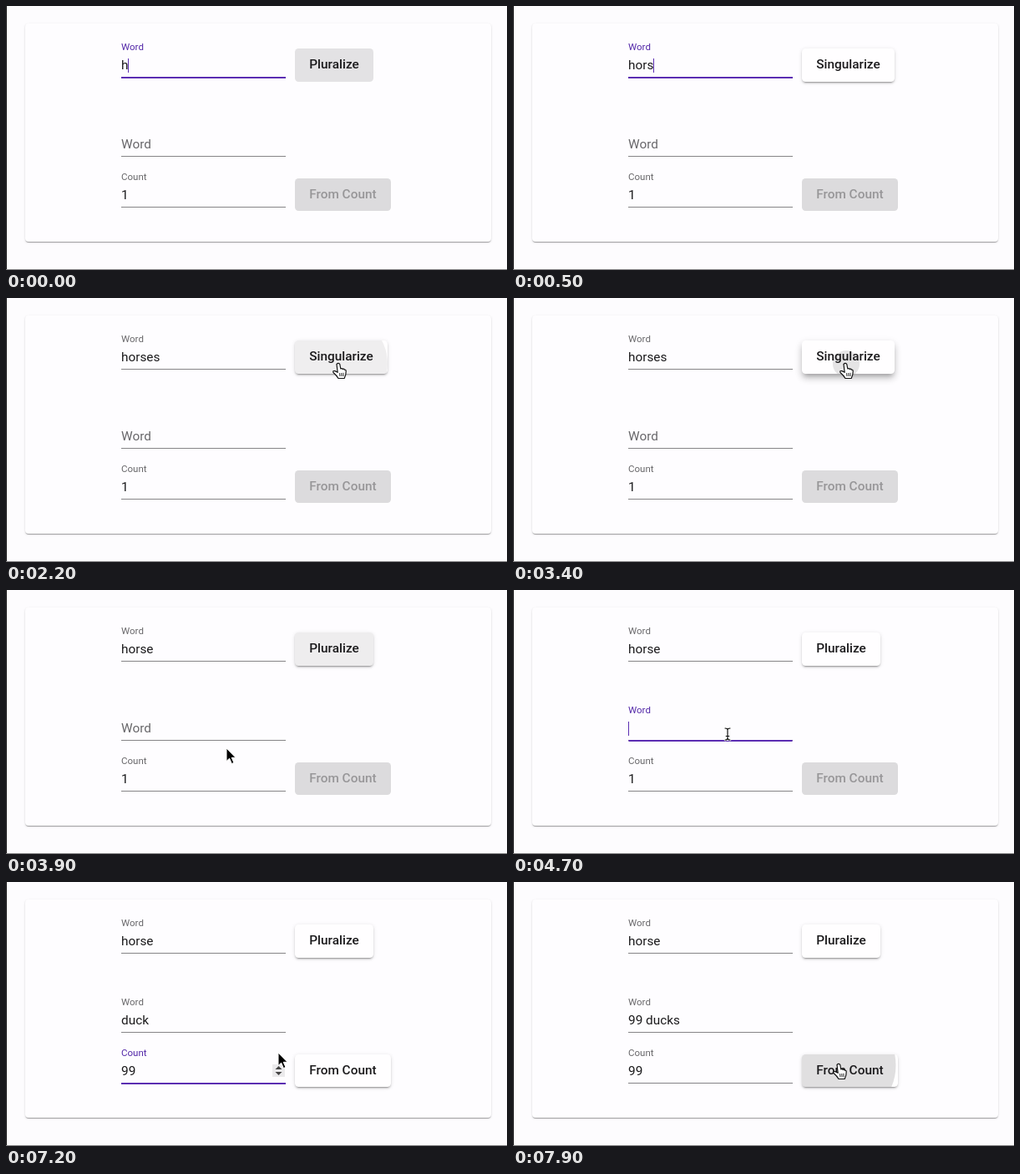
An HTML page that plays this animation: 600x317 px, repeating every 8000 ms.

```html
<!DOCTYPE html>
<html lang="en">
<head>
<meta charset="utf-8">
<title>Pluralize form</title>
<style>
  html, body { margin: 0; width: 100%; height: 100%; overflow: hidden; background: #fdfcfe; }
  #stage { position: relative; width: 600px; height: 317px; overflow: hidden;
    font: 15.36px/20px Roboto, sans-serif; color: #1b1a1c; white-space: nowrap; }
  #stage div, #stage i, #stage svg { position: absolute; }
  .left { left: 0; top: 0; width: 1px; height: 317px; background: #1c1b1d; }
  .bottom { left: 0; top: 316px; width: 600px; height: 1px; background: #828183; }
  .card { left: 23px; top: 21px; width: 557.5px; height: 262px; border-radius: 4px; background: #fefdff;
    box-shadow: 0 2px 1px -1px rgba(0,0,0,.2), 0 1px 1px rgba(0,0,0,.14), 0 1px 3px rgba(0,0,0,.12); }
  .field { left: 138px; width: 197px; height: 48px; }
  .label { left: 0; top: 21.2px; transform-origin: 0 50%; }
  .text { left: 0; top: 21.2px; }
  .text span { padding: 1px 0; }
  .caret { top: 2px; width: 1px; height: 17px; background: #5b2db2; }
  .line { left: 0; top: 45px; width: 197px; height: 1px; background: #858486; }
  .focus { left: 0; top: 45px; width: 197px; height: 2px; background: #5b2db2; }
  .spin { right: 1px; top: 23.5px; width: 15px; height: 15px; background: #ebeaec; }
  .button { left: 345.8px; height: 39.4px; padding: 0 17.5px; border-radius: 4.4px;
    font-weight: 500; line-height: 39.4px;
    box-shadow: 0 3px 1px -2px rgba(0,0,0,calc(.2*var(--up))), 0 2px 2px rgba(0,0,0,calc(.14*var(--up))),
      0 1px 5px rgba(0,0,0,calc(.12*var(--up))); }
  .button.down { box-shadow: 0 5px 5px -3px rgba(0,0,0,.2), 0 6px 8px 0 rgba(0,0,0,.14), 0 3px 8px 1px rgba(0,0,0,.1); }
  .button span { position: relative; }
  .clip { inset: 0; overflow: hidden; border-radius: inherit; }
  .ripple { border-radius: 50%; background: #000; }
  #cursor { left: 0; top: 0; overflow: visible; width: 1px; height: 1px; }
</style>
</head>
<body>
<div id="stage">
  <div class="card"></div>
  <div class="left"></div>
  <div class="bottom"></div>
  <svg id="cursor">
    <g id="arrow"><path d="M0 0V15.5L3.6 12.2 6.4 18.6 9 17.4 6.2 11.3H11Z" fill="#000" stroke="#fff"/></g>
    <g id="hand">
      <path d="M-2 1.5Q0-.8 1.8 1.5L2.8 7Q4 5.8 5 7.4 6.6 6.4 7.4 8.2 9.2 7.8 9.2 10 9.4 14 7.2 18.5H0Q-2 15-6 11.5-7 9-4 9.6L-.8 11.3Z"
        fill="#fff" stroke="#111" stroke-width="1.2" stroke-linejoin="round"/>
      <path d="M1.5 12.2L2 16M3.7 12L4.1 16M5.9 11.8L6.1 16" stroke="#111" stroke-width=".9"/>
    </g>
    <g id="beam" fill="none" stroke-linecap="round">
      <path d="M-3-7Q0-7 0-5V5Q0 7-3 7M3-7Q0-7 0-5M0 5Q0 7 3 7M-1.8 2.5H1.8" stroke="#fff" stroke-width="2.6"/>
      <path d="M-3-7Q0-7 0-5V5Q0 7-3 7M3-7Q0-7 0-5M0 5Q0 7 3 7M-1.8 2.5H1.8" stroke="#111" stroke-width="1.2"/>
    </g>
  </svg>
</div>
<script>
const LOOP = 8000, STEP = 100;
const stage = document.getElementById('stage');
const cursor = document.getElementById('cursor');

const clamp = v => Math.min(1, Math.max(0, v));
const easeOut = p => 1 - (1 - clamp(p)) ** 3;
const ramp = (t, start, length) => easeOut((t - start) / length);
const within = (t, spans) => spans.some(([a, b]) => t >= a && t < b);
const mix = (a, b, p) => `rgb(${a.map((v, i) => Math.round(v + (b[i] - v) * p))})`;
const latest = (t, steps) => steps.reduce((value, [at, next]) => t >= at ? next : value, '');

// Linear interpolation through [time, ...values] rows.
function track(t, rows) {
  const i = rows.findIndex(row => row[0] > t);
  if (i < 0) return rows[rows.length - 1].slice(1);
  if (i === 0) return rows[0].slice(1);
  const a = rows[i - 1], b = rows[i], p = (t - a[0]) / (b[0] - a[0]);
  return a.slice(1).map((v, k) => v + (b[k + 1] - v) * p);
}

function add(parent, className, tag = 'div') {
  const node = document.createElement(tag);
  node.className = className;
  return parent.appendChild(node);
}

const GREY = [104, 103, 106], PURPLE = [83, 40, 168];

const fields = [
  { top: 40, label: 'Word', focus: [-1000, 1600], floatAt: -1000,
    caret: [[0, 1200]],
    text: [[0, 'h'], [100, 'ho'], [300, 'hor'], [500, 'hors'], [700, 'horse'],
           [1800, 'horses'], [3500, 'horse']] },
  { top: 135, label: 'Word', focus: [4540, 5650], floatAt: 4540,
    caret: [[4600, 5700]],
    text: [[5200, 'd'], [5300, 'du'], [5400, 'duc'], [5500, 'duck'], [7800, '99 ducks']] },
  { top: 195.7, label: 'Count', focus: [5650, 7640], floatAt: -1000, spinner: true,
    caret: [[6300, 7000], [7500, 7640]], selected: [[5700, 6300]],
    text: [[0, '1'], [6300, '9'], [6500, '99']] }
];

const buttons = [
  { top: 51.3, enableAt: -30, pressed: [[1600, 1800], [3400, 3500]],
    text: [[0, 'Pluralize'], [500, 'Singularize'], [700, 'Pluralize'],
           [1800, 'Singularize'], [3500, 'Pluralize']],
    ripples: [
      { x: 51.5, y: 28, r: 60, start: 1620, alpha: [[2000, .1], [2200, .062], [3399, .062], [3400, 0]] },
      { x: 53, y: 28, r: 66, start: 3360, alpha: [[3500, .1], [3800, .065], [3900, .065], [4200, 0]] }
    ] },
  { top: 206.9, enableAt: 5170, pressed: [[7600, 7800]], text: [[0, 'From Count']],
    ripples: [{ x: 45, y: 13, r: 74, start: 7650, alpha: [[7650, .12]] }] }
];

const pointer = [
  [900, 424, 100], [1100, 402, 98], [1300, 395, 86], [1500, 398, 78], [3700, 398, 78],
  [3800, 318, 148], [3900, 264, 190], [4000, 256, 198], [4200, 258, 186], [4400, 257, 173],
  [6900, 257, 173], [7100, 300, 196], [7300, 352, 214], [7500, 390, 218]
];
const pointerShown = [[900, 5200], [6900, LOOP]];

for (const f of fields) {
  const root = add(stage, 'field');
  root.style.top = f.top + 'px';
  f.labelNode = add(root, 'label');
  f.labelNode.textContent = f.label;
  const text = add(root, 'text');
  f.textNode = add(text, '', 'span');
  f.caretNode = add(text, 'caret', 'i');
  add(root, 'line');
  f.focusNode = add(root, 'focus');
  if (f.spinner) {
    f.spinNode = add(root, 'spin');
    f.spinNode.innerHTML = '<svg width="15" height="15"><path d="M3.5 6L7.5 2 11.5 6ZM3.5 9L7.5 13 11.5 9Z" fill="#444"/></svg>';
  }
}

for (const b of buttons) {
  b.node = add(stage, 'button');
  b.node.style.top = b.top + 'px';
  const clip = add(b.node, 'clip');
  for (const r of b.ripples) {
    r.node = add(clip, 'ripple');
    Object.assign(r.node.style, {
      left: r.x - r.r + 'px', top: r.y - r.r + 'px', width: 2 * r.r + 'px', height: 2 * r.r + 'px'
    });
  }
  b.textNode = add(b.node, '', 'span');
}
stage.append(cursor);

function drawField(f, t) {
  const [on, off] = f.focus;
  const focus = ramp(t, on, 170) * (1 - ramp(t, off, 300));
  const lift = ramp(t, f.floatAt, 170);
  f.labelNode.style.transform = `translateY(${-21.6 * lift}px) scale(${1 - .25 * lift})`;
  f.labelNode.style.color = mix(GREY, PURPLE, focus);
  f.textNode.textContent = latest(t, f.text);
  f.textNode.style.background = within(t, f.selected || []) ? '#a8cdf2' : 'none';
  f.caretNode.style.opacity = within(t, f.caret) ? 1 : 0;
  f.focusNode.style.opacity = focus;
  f.focusNode.style.transform = `scaleX(${.5 + .5 * ramp(t, on, 200)})`;
  if (f.spinNode) f.spinNode.style.opacity = within(t, [f.focus]) ? 1 : 0;
}

function drawButton(b, t) {
  const enabled = t >= b.enableAt;
  const style = b.node.style;
  style.background = mix([220, 219, 221], [255, 254, 255], ramp(t, b.enableAt, 400));
  style.color = enabled ? '#1b1a1c' : '#979698';
  style.setProperty('--up', t < b.enableAt + 40 ? 0 : ramp(t, b.enableAt, 280));
  b.node.classList.toggle('down', within(t, b.pressed));
  b.textNode.textContent = latest(t, b.text);
  for (const r of b.ripples) {
    r.node.style.opacity = t < r.start ? 0 : track(t, r.alpha)[0];
    r.node.style.transform = `scale(${ramp(t, r.start, 450)})`;
  }
}

function drawCursor(t) {
  const [x, y] = track(t, pointer);
  const onButton = x > 346 && x < 460 && ((y > 51 && y < 91) || (y > 207 && y < 246));
  const onInput = x > 138 && x < 335 && ((y > 155 && y < 181) || (y > 216 && y < 241));
  const shape = onButton ? 'hand' : onInput ? 'beam' : 'arrow';
  for (const g of cursor.children) g.style.display = g.id === shape ? '' : 'none';
  cursor.style.display = within(t, pointerShown) ? '' : 'none';
  cursor.style.transform = `translate(${x}px, ${y}px)`;
}

function render(time) {
  const t = Math.floor(time % LOOP / STEP) * STEP;
  fields.forEach(f => drawField(f, t));
  buttons.forEach(b => drawButton(b, t));
  drawCursor(t);
}

const begin = performance.now();
function tick() {
  render(performance.now() - begin);
  requestAnimationFrame(tick);
}
tick();
</script>
</body>
</html>
```
